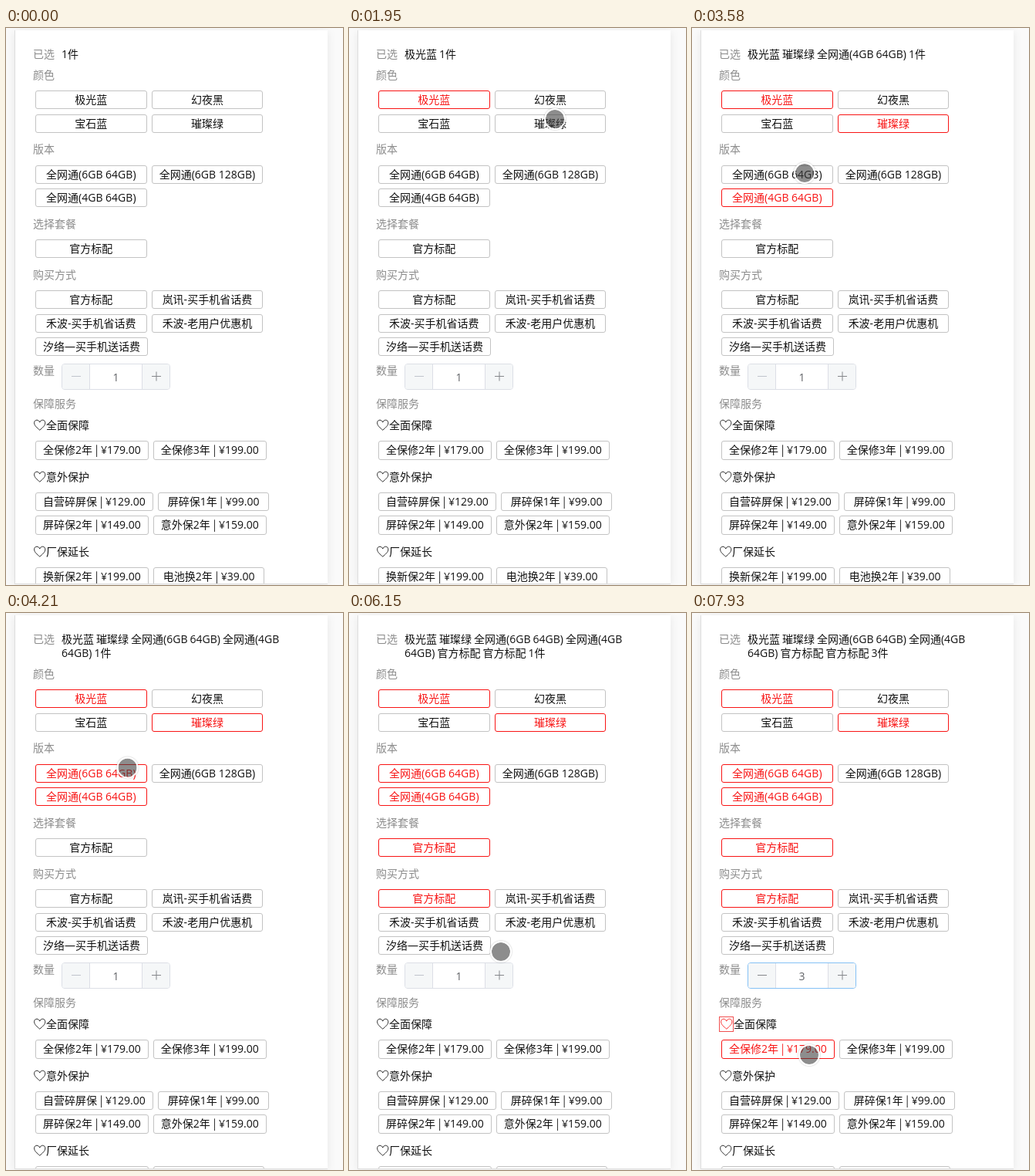
Recreate the animation shown at these times as an HTML page. Size 437 px wide and 722 px high, loop 8 s.

```html
<!DOCTYPE html>
<html lang="zh-CN">
<head>
<meta charset="utf-8">
<title>选购面板</title>
<style>
  html, body { margin: 0; width: 100%; height: 100%; overflow: hidden; background: #fafafa; }
  #stage {
    position: relative; width: 437px; height: 722px; overflow: hidden;
    font: 14px/20px "Open Sans", "Noto Sans CJK SC", "Noto Sans CJK", sans-serif; color: #111;
  }
  #card {
    position: absolute; left: 11px; top: 3px; width: 406px; height: 718px; overflow: hidden;
    box-sizing: border-box; padding: 22px 0 0 23px; background: #fff;
    border: solid #dedede; border-width: 0 0 1px 1px;
    box-shadow: 0 2px 12px rgba(0, 0, 0, .08);
  }
  .dim { color: #8c8c8c; }
  #chosen { display: flex; line-height: 18px; margin-bottom: 8px; }
  #picked { width: 296px; margin-left: 9px; word-spacing: -.6px; }
  .title { display: flex; align-items: center; height: 20px; }
  .options {
    display: flex; flex-wrap: wrap; gap: 6.3px 6px; max-width: 310px;
    margin: 10.3px 0 11.5px 3px;
  }
  .service .options { margin-bottom: 12px; }
  .option {
    box-sizing: border-box; min-width: 144.6px; height: 24.2px; padding: 0 9px;
    line-height: 22px; text-align: center; white-space: pre;
    border: 1px solid #c3c3c3; border-radius: 3px;
  }
  .option b { font: 14px/0 "Noto Sans CJK SC", "Noto Sans CJK", sans-serif; }
  .on { color: #f81414; border-color: #f81414; }
  .heart { width: 17.5px; height: 18px; flex: none; margin-left: -.5px; }
  .heart.on { border: 1px solid #f05050; }
  .heart path { fill: none; stroke: currentColor; stroke-width: .9; }
  #amount { display: flex; height: 43px; margin-top: -3px; }
  #count {
    display: flex; box-sizing: border-box; width: 141px; height: 34px; margin: 1px 0 0 9px;
    overflow: hidden; border: 1px solid #dcdfe6; border-radius: 4px; color: #606266;
  }
  #count.live { border-color: #409eff; }
  #count.fading { border-color: #85c1f5; }
  #count svg { width: 35px; height: 32px; background: #f5f7f8; stroke: #85878b; }
  #count:not(.live) svg:first-child { stroke: #c0c4cc; }
  #num { flex: 1; line-height: 34px; text-align: center; border: solid #dcdfe6; border-width: 0 1px; }
  #services { margin-bottom: 8.2px; }
  #dot {
    position: absolute; left: -14px; top: -14px; width: 24px; height: 24px; border-radius: 50%;
    border: 2px solid rgba(255, 255, 255, .9); background: rgba(60, 60, 60, .58) padding-box;
    box-shadow: 0 0 2px rgba(0, 0, 0, .3);
  }
</style>
</head>
<body>
<div id="stage">
  <div id="card">
    <div id="chosen"><span class="dim">已选</span><span id="picked"></span></div>
    <div id="specs"></div>
    <div id="amount">
      <span class="dim">数量</span>
      <div id="count">
        <svg><path d="M12 15.5h12"/></svg>
        <span id="num"></span>
        <svg><path d="M12 15.5h12M18 9.5v12"/></svg>
      </div>
    </div>
    <div id="services" class="dim">保障服务</div>
    <div id="care"></div>
  </div>
  <div id="dot"></div>
</div>
<script>
const LOOP = 8000, TICK = 77;
const $ = id => document.getElementById(id);

const specs = {
  颜色: ['极光蓝', '幻夜黑', '宝石蓝', '璀璨绿'],
  版本: ['全网通(6GB 64GB)', '全网通(6GB 128GB)', '全网通(4GB 64GB)'],
  选择套餐: ['官方标配'],
  购买方式: ['官方标配', '岚讯-买手机省话费', '禾波-买手机省话费', '禾波-老用户优惠机', '汐络—买手机送话费']
};
const care = {
  全面保障: ['全保修2年 | ¥179.00', '全保修3年 | ¥199.00'],
  意外保护: ['自营碎屏保 | ¥129.00', '屏碎保1年 | ¥99.00', '屏碎保2年 | ¥149.00', '意外保2年 | ¥159.00'],
  厂保延长: ['换新保2年 | ¥199.00', '电池换2年 | ¥39.00']
};
const heart = '<svg class="heart" viewBox="0 0 18 18"><path d="M9 15.4C5.6 12.4 1.7 9.5 1.7 5.8' +
  'C1.7 3.4 3.3 2 5.1 2C7 2 8.3 3.3 9 5C9.7 3.3 11 2 12.9 2C14.7 2 16.3 3.4 16.3 5.8' +
  'C16.3 9.5 12.4 12.4 9 15.4Z"/></svg>';

function build(parent, groups, kind, icon = '') {
  for (const [title, names] of Object.entries(groups)) {
    const options = names.map(name =>
      `<div class="option" data-key="${title}/${name}">${name.replace('|', '<b>|</b>')}</div>`);
    parent.innerHTML += `<div class="${kind}"><div class="title">${icon}${title}</div>` +
      `<div class="options">${options.join('')}</div></div>`;
  }
}
build($('specs'), specs, 'dim-title');
build($('care'), care, 'service', heart);
$('specs').querySelectorAll('.title').forEach(el => el.classList.add('dim'));

const clicks = {
  '颜色/极光蓝': 1020,
  '颜色/璀璨绿': 2100,
  '版本/全网通(4GB 64GB)': 3280,
  '版本/全网通(6GB 64GB)': 3750,
  '购买方式/官方标配': 5210,
  '选择套餐/官方标配': 5770,
  '全面保障/全保修2年 | ¥179.00': 7930
};
const plusClicks = [6930, 7090];

// Pointer moves; bow bends the path sideways, as a share of its length
const moves = [
  { from: 70, to: 390, x: 121, y: 84 },
  { from: 770, to: 770, x: 120, y: 99 },
  { from: 1180, to: 1950, x: 267, y: 118, bow: .08 },
  { from: 2250, to: 3120, x: 143, y: 224, bow: -.2 },
  { from: 3280, to: 3580, x: 146, y: 188 },
  { from: 3900, to: 3900, x: 146, y: 194 },
  { from: 4130, to: 4980, x: 113, y: 376, bow: -.75 },
  { from: 5210, to: 5600, x: 118, y: 308 },
  { from: 5770, to: 6150, x: 197, y: 439 },
  { from: 6150, to: 6470, x: 210, y: 486 },
  { from: 6780, to: 6780, x: 206, y: 481 },
  { from: 7160, to: 7780, x: 152, y: 573, bow: -.4 }
];

const ease = p => p * p * (3 - 2 * p);

function pointerAt(t) {
  let pos = { x: 297, y: 578 };
  for (const { from, to, x, y, bow = 0 } of moves) {
    if (t < from) break;
    const elapsed = Math.floor((t - from) / TICK) * TICK;
    const p = t >= to ? 1 : ease(elapsed / (to - from));
    const dx = x - pos.x, dy = y - pos.y, bend = bow * 4 * p * (1 - p);
    pos = { x: pos.x + dx * p - dy * bend, y: pos.y + dy * p + dx * bend };
  }
  return pos;
}

const options = [...document.querySelectorAll('.option')];
let shown = '';

function draw(t) {
  for (const el of options) el.classList.toggle('on', t >= clicks[el.dataset.key]);
  for (const el of document.querySelectorAll('.service'))
    el.querySelector('.heart').classList.toggle('on', !!el.querySelector('.option.on'));

  const count = 1 + plusClicks.filter(time => t >= time).length;
  const names = [...$('specs').querySelectorAll('.on')].map(el => el.textContent);
  const summary = [...names, count + '件'].join(' ');
  if (summary !== shown) $('picked').textContent = shown = summary;

  $('num').textContent = count;
  $('count').classList.toggle('live', count > 1);
  $('count').classList.toggle('fading', !!$('care').querySelector('.option.on'));

  const { x, y } = pointerAt(t);
  $('dot').style.visibility = t < moves[0].from ? 'hidden' : 'visible';
  $('dot').style.transform = `translate(${x}px, ${y}px)`;
}

const began = performance.now();
function tick() {
  draw((performance.now() - began) % LOOP);
  requestAnimationFrame(tick);
}
tick();
</script>
</body>
</html>
```
